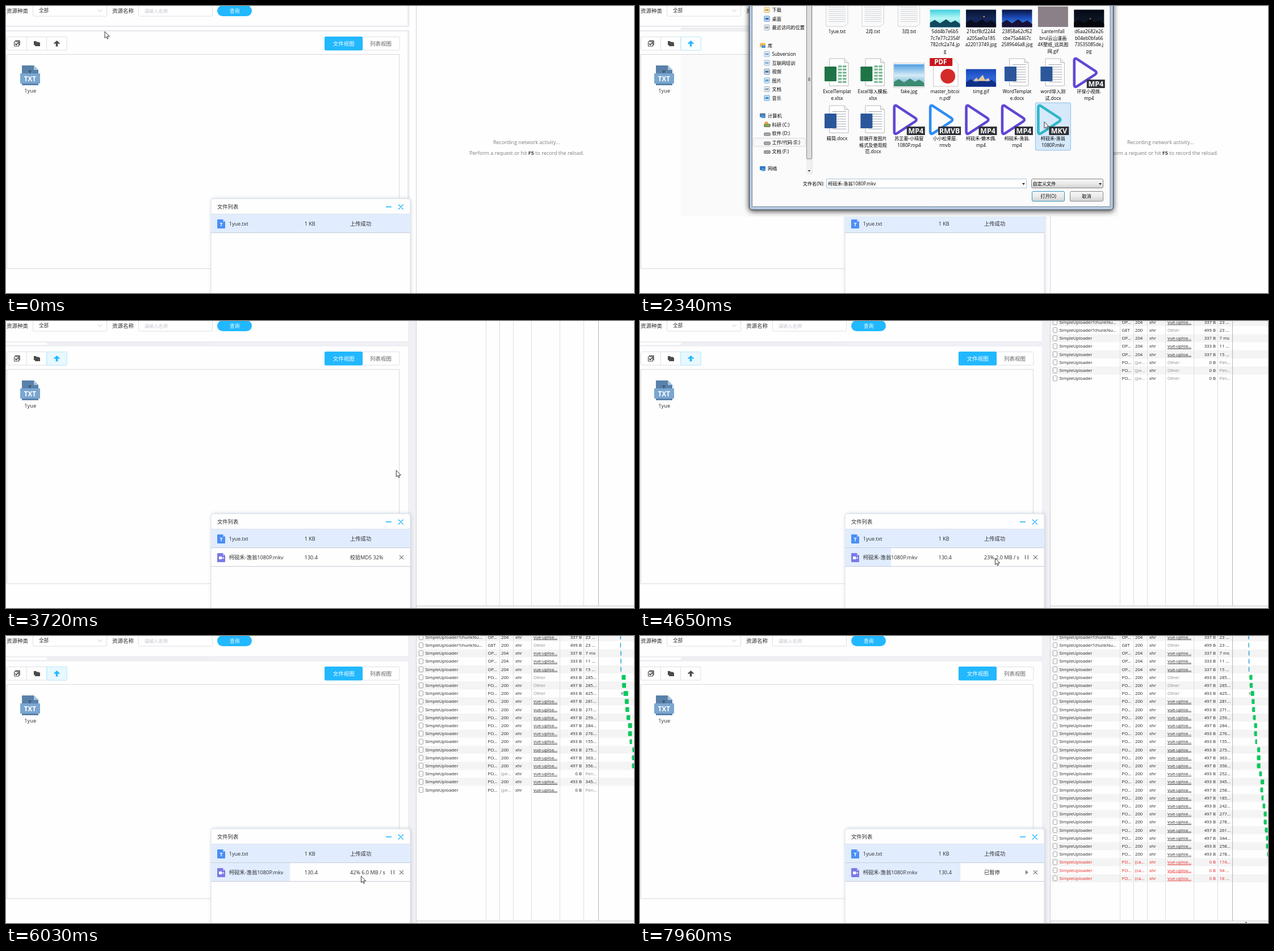
Recreate the animation shown at these times as an HTML page with a canvas. Size 1106 px wide and 507 px high, loop 8 s.

```html
<!DOCTYPE html>
<html lang="zh">
<meta charset="utf-8">
<style>
  html, body { margin: 0; width: 100%; height: 100%; overflow: hidden; background: #fff }
  canvas { display: block }
</style>
<canvas id="stage" width="1106" height="507"></canvas>
<script>
const g = document.getElementById('stage').getContext('2d');
const FONT = '"Open Sans","Noto Sans CJK SC","Noto Sans CJK JP","Noto Sans CJK",sans-serif';
const BLUE = '#22b8ff', LINE = '#dcdfe6', INK = '#2a2b2e';
const LOOP = 8000, VIDEO = '柯砚禾-渔翁1080P.mkv';

// Moments at which the picture is refreshed: first, last, count.
const ticks = [[0, 0, 1], [280, 850, 5], [1130, 1280, 2], [1410, 2100, 6], [2220, 3060, 7],
  [3210, 3210, 1], [3330, 4270, 8], [4410, 4650, 3], [4770, 5310, 5], [5460, 6450, 8],
  [6570, 6690, 2], [6840, 7570, 6], [7690, 7960, 3]]
  .flatMap(([a, b, n]) => Array.from({ length: n }, (_, i) => a + (n > 1 ? (b - a) * i / (n - 1) : 0)));
const OPEN = 1130, CLOSE = 2490, START = 3210, UPLOAD = 4400, PAUSE = 6980;

function key(points, t, col = 1) {
  const i = points.findIndex(p => p[0] > t);
  if (i < 0) return points.at(-1)[col];
  if (!i) return points[0][col];
  const a = points[i - 1], b = points[i];
  return a[col] + (b[col] - a[col]) * (t - a[0]) / (b[0] - a[0]);
}

function box(x, y, w, h, fill, stroke, r = 0) {
  g.beginPath();
  g.roundRect(x, y, w, h, r);
  if (fill) { g.fillStyle = fill; g.fill(); }
  if (stroke) { g.strokeStyle = stroke; g.lineWidth = 1; g.stroke(); }
}
function text(s, x, y, { size = 9.3, color = INK, align = 'left', weight = 400 } = {}) {
  g.font = `${weight} ${size}px ${FONT}`;
  g.fillStyle = color;
  g.textAlign = align;
  g.fillText(s, x, y + size * .37);
}
function path(d, x, y, fill, stroke, width = 1) {
  const p = new Path2D(d);
  g.save();
  g.translate(x, y);
  if (fill) { g.fillStyle = fill; g.fill(p); }
  if (stroke) {
    g.lineJoin = g.lineCap = 'round';
    g.strokeStyle = stroke;
    g.lineWidth = width;
    g.stroke(p);
  }
  g.restore();
}
function vertical(x, y, h, ...colors) {
  const v = g.createLinearGradient(x, y, x, y + h);
  colors.forEach((c, i) => v.addColorStop(i / (colors.length - 1), c));
  return v;
}

function page(t) {
  box(0, 0, 1106, 507, '#fefefe');
  const gutter = t >= START ? '#f1f1f5' : '#fff';
  box(0, 34, 722, 12, gutter);
  box(707, 0, 15, 507, gutter);
  if (t >= OPEN) {
    box(72, 38, 288, 4, '#eeeef1');
    box(0, 38, 72, 4, '#fff');
  }
  box(-9, -20, 718, 56.5, '#fefefe', '#e6e8ef', 3);
  box(-9, 44, 718, 520, '#fefefe', '#e6e8ef', 3);
  if (t < START) {
    box(0, 34.5, 709, 2.5, '#e9ebf1');
    box(0, 42.5, 709, 2.5, '#e9ebf1');
    box(707, 0, 3.5, 36, '#e9ebf1');
    box(707, 43, 3.5, 464, '#e9ebf1');
  }
  box(722, 0, 1, 507, '#d2d2d4');

  text('资源种类', 1, 8, { size: 9.5 });
  box(47.5, -8, 130, 26, '#fff', LINE, 2);
  text('全部', 58, 8, { size: 8.6 });
  path('M-3.5-1.5 0 2 3.5-1.5', 166, 8, null, '#c0c4cc');
  text('资源名称', 187, 8, { size: 9.5 });
  box(233.5, -8, 130, 26, '#fff', LINE, 2);
  text('请输入名称', 243.5, 8.5, { size: 8.4, color: '#c0c4cc' });
  box(372, -1, 61, 19, BLUE, null, 9.5);
  text('查询', 402.7, 8.5, { size: 8.6, color: '#fff', align: 'center', weight: 500 });

  const hover = t >= 700 && t < PAUSE;
  box(1.5, 54.5, 105.5, 23.5, '#fff', LINE, 2);
  if (hover) box(72, 54.5, 35, 23.5, t < CLOSE ? '#fbfeff' : '#e8f8ff', '#bde9ff');
  box(36, 54, 1, 24, LINE);
  box(71, 54, 1, 24, hover ? '#bde9ff' : LINE);
  box(14.5, 63, 8, 8, null, '#444');
  path('M16.5 61.5H24V69', 0, 0, null, '#444', 1.4);
  path('M16.3 66.8 18 68.6 21.2 65', 0, 0, null, '#444', 1.6);
  path('M49 62H53L54 63.5H58V69H49Z', 0, 0, '#4a4a4a');
  path('M51 64.5H60V71H51Z', 0, 0, '#4a4a4a');
  path('M0-5 5.5 0 4.5 1.2 1.8 0V5.5H-1.8V0L-4.5 1.2-5.5 0Z M-4 2.5H4', 89.5, 66, hover ? BLUE : '#4a4a4a');

  box(628, 54.5, 65, 23.5, '#fff', LINE, 2);
  box(561, 54, 67, 24.5, BLUE, null, 2);
  text('文件视图', 594.7, 66.3, { size: 9.5, color: '#fff', align: 'center' });
  text('列表视图', 660, 66.3, { size: 9.5, color: '#606266', align: 'center' });

  box(1.5, 85.5, 691, 378.5, '#fefefe', '#d8d8d8');
  path('M28 105H49L57 113V140H28Z', 0, 0, '#5981a9');
  path('M49 105V113H57Z', 0, 0, '#a9c4de');
  text('T', 42, 118, { size: 11, color: '#35516f', align: 'center', weight: 700 });
  box(25, 119, 35, 18, '#7aa6d0', null, 1);
  text('TXT', 42.3, 129, { size: 11.5, color: '#fff', align: 'center', weight: 700 });
  text('1yue', 42.7, 149.5, { align: 'center' });
}

function idlePanel() {
  const o = { size: 9, color: '#7c7c7c' };
  text('Recording network activity...', 916.7, 240.5, { ...o, align: 'center' });
  let x = 816.3;
  for (const [s, weight] of [['Perform a request or hit ', 400], ['F5', 700], [' to record the reload.', 400]]) {
    text(s, x, 259.5, { ...o, weight, color: weight > 400 ? '#444' : o.color });
    x += g.measureText(s).width;
  }
}

const DURATIONS = [23, 23, 7, 11, 15, 285, 285, 425, 281, 271, 259, 284, 276, 155, 275, 363, 356, 252,
  345, 258, 185, 242, 277, 278, 261, 344, 258, 278, 174, 94, 16];
const BAR_STARTS = [30.7, 31.2, 33, 34.7, 35.5, 37, 39, 39, 41, 44.5, 44, 44, 48, 50.5, 50, 52, 54, 56,
  56, 58, 60, 60, 62];
const LARGE = [6, 8, 10, 11, 15, 16, 19, 20, 22, 24, 25];

function network(t) {
  const total = Math.floor(key([[4409, 0], [4410, 2], [4530, 5], [4650, 8], [5460, 14], [6690, 29], [PAUSE, 31]], t));
  const done = Math.floor(key([[4409, 0], [4410, 2], [4530, 5], [4650, 5], [5460, 11], [6690, 25], [PAUSE, 28]], t));
  const zoom = key([[4650, 2.3], [4790, 2.15], [5460, 1.62], [6690, 1.06], [7700, 1]], t);
  for (let i = 0; i < total; i++) {
    const y = 2 + 14.2 * i;
    if (i % 2 == 0) box(723, y - 7, 383, 14.2, '#f4f4f4');
    const early = i == done + 1 && t > 5000 && t < PAUSE;
    const ok = i < done || early, partial = early && t < 6000;
    const canceled = !ok && t >= PAUSE;
    const color = canceled ? '#e8211f' : '#222', o = { size: 7.75, color };
    const muted = { ...o, color: canceled || ok ? color : '#888' };
    const other = i == 1 || i > 4 && i < 8;
    box(727.5, y - 4.5, 7, 9, '#fff', '#a0a0a0', 1);
    text(i < 2 ? 'SimpleUploader?chunkNu...' : 'SimpleUploader', 738.5, y, o);
    text(i == 1 ? 'GET' : i < 5 ? 'OP...' : 'PO...', 848.5, y, o);
    text(canceled ? '(ca...' : !ok ? '(pe...' : i != 1 && i < 5 ? '204' : '200', 872, y, muted);
    text('xhr', 897, y, o);
    text(other ? 'Other' : 'vue-uploa...', 929, y, { ...o, color: other ? '#888' : color });
    if (!other) box(929, y + 4, 42, .8, color);
    const size = !ok ? 0 : partial ? 334 : i == 1 ? 499 : i == 3 ? 333 : i < 5 ? 337 : LARGE.includes(i) ? 497 : 493;
    text(size + ' B', 1014, y, { ...o, align: 'right' });
    const ms = DURATIONS[i], waiting = !canceled && (!ok || partial);
    const time = waiting ? 'Pen...' : ms > 99 ? ms + '...' : ms > 9 ? ms + ' ...' : ms + ' ms';
    text(time, 1020.5, y, { ...o, color: waiting ? '#888' : color });
    if (i < 5) box(1043 + (i < 2 ? 28.3 : 28.8) * zoom, y - 4, 1.5, 8, i == 1 ? '#36b0c9' : '#1ea1dc');
    else if (ok) {
      const x = 1043 + BAR_STARTS[i - 5] * zoom;
      if (i == 7) box(x - 3.5 * zoom, y - 2, 3 * zoom, 4, '#aaa');
      else box(x - 1.6, y - 2, 1, 4, '#c8c8c8');
      box(x - .3, y - 4.2, Math.min(ms, 340) / 62 * zoom + .5, 8.6, '#08c95c');
    }
  }
  for (const x of [845, 869, 893, 925, 975, 1017]) box(x, 0, 1, 503, '#dedede');
  box(1043, 0, 1, 503, '#b4b4b4');
  box(723, 503, 383, 1, '#c4c4c4');
}

function fileIcon(y, color) {
  path('M1 0H10L14 4V15Q14 16 13 16H1Q0 16 0 15V1Q0 0 1 0Z', 372, y, color);
  path('M10 0V4H14Z', 372, y, '#ffffff88');
}

function uploads(t) {
  g.save();
  g.shadowColor = '#8090b066';
  g.shadowBlur = 6;
  g.shadowOffsetX = 1;
  box(361, 340, 351, 180, '#fff', null, 5);
  g.restore();
  box(361, 340.5, 351, 180, '#fefefe', '#dde1ea', 5);
  text('文件列表', 372, 354.5);
  box(669, 354, 10, 1.6, BLUE);
  path('M-4-4 4 4M4-4-4 4', 695.3, 355, null, BLUE, 1.4);
  box(361.5, 367, 350, 33.5, '#e1edfe');
  box(361, 367, 351, 1, '#dbe0ea');
  box(361, 400, 351, 1, '#c6ccd6');
  fileIcon(377, '#4b8ff8');
  text('T', 379, 386, { size: 9, color: '#fff', align: 'center', weight: 700 });
  text('1yue.txt', 392.7, 384.3, { size: 9.1 });
  text('1 KB', 525.7, 384.3, { size: 9.1 });
  text('上传成功', 606, 384.3);

  if (t < START) return;
  const paused = t >= PAUSE;
  const fill = key([[UPLOAD, 0], [4530, .13], [4650, .23], [5460, .302], [6690, .504], [7300, .578]], t);
  box(361.5, 401, 351 * fill, 32.5, '#e1edfe');
  box(361, 433, 351, 1, '#c6ccd6');
  fileIcon(410, '#7b79e8');
  box(375, 416, 5.5, 5, '#fff', null, 1);
  path('M381 418.5 383.5 416.5V420.5Z', 0, 0, '#fff');
  text(VIDEO, 392.7, 417.3);
  text('130.4', 525.7, 417.3, { size: 9.1 });
  const percent = Math.floor(key([[UPLOAD, 0], [4530, 12], [4650, 23], [5460, 31], [6690, 56], [PAUSE, 59]], t));
  const speed = key([[UPLOAD, .4], [4650, 2], [5460, 3.7], [6690, 8.7]], t).toFixed(1);
  const check = Math.floor(key([[START, 0], [UPLOAD, 100]], t));
  text(paused ? '已暂停' : t < UPLOAD ? `校验MD5 ${check}%` : `${percent}% ${speed} MB / s`, 606, 417.3, { size: paused ? 9.3 : 9.1 });
  if (paused) path('M679 413.5V421.5L684 417.5Z', 0, 0, '#888');
  else if (t >= UPLOAD) {
    const color = t > 6600 ? '#1768b8' : '#999';
    box(677.7, 413.5, 2, 7.5, color);
    box(682.3, 413.5, 2, 7.5, color);
  }
  path('M-3.2-3.2 3.2 3.2M3.2-3.2-3.2 3.2', 696.5, 417.5, null, '#777', 1.2);
}

const NAV = [['下载', 7, '#e2ad46'], ['桌面', 22.5, '#3474c4'], ['最近访问的位置', 38, '#9aa9b8'],
  ['库', 69.5, '#e8bd58', 1], ['Subversion', 85, '#8cb2d8'], ['互联网培训', 100.5, '#8cb2d8'], ['视频', 116, '#52779f'],
  ['图片', 131.5, '#62a5d8'], ['文档', 147, '#9aa9b8'], ['音乐', 162.5, '#3c92d8'], ['计算机', 193.5, '#527ba8', 1],
  ['科研 (C:)', 209.5, '#77a84e'], ['软件 (D:)', 225, '#a3a8ae'], ['工作/代码 (E:)', 241, '#a3a8ae'],
  ['文档 (F:)', 256.5, '#a3a8ae'], ['网络', 287, '#317bc5', 1]];

const FILES = [
  ['text', '1yue.txt'], ['text', '2月.txt'], ['text', '3月.txt'], ['peaks', '5dd4b7e6b5|7c7e77c2354f|782cfc2a74.jp|g'],
  ['night', '21bcf8cf2244|a205ae0a185|a22013749.jpg'], ['dusk', '23858a62cf62|cbe75a4467c|2589646a8.jpg'],
  ['paint', 'Lanternfall|brul云山漫画|4K壁纸_远岚图|网.gif'], ['dark', 'd6aa2682e26|b04eb0bfa66|73535085de.j|pg'],
  ['sheet', 'ExcelTemplat|e.xlsx'], ['sheet', 'Excel导入模板.|xlsx'], ['lake', 'fake.jpg'], ['pdf', 'master_bitcoi|n.pdf'],
  ['harbor', 'timg.gif'], ['doc', 'WordTemplat|e.docx'], ['doc', 'word导入测|试.docx'], ['MP4', '环保小视频.|mp4'],
  ['doc', '精简.docx'], ['doc', '前端开发图片|格式及使用规|范.docx'], ['MP4', '苏芷蘅-小晴窗|1080P.mp4'], ['RMVB', '小小松果屋.|rmvb'],
  ['MP4', '柯砚禾-懒木偶.|mp4'], ['MP4', '柯砚禾-渔翁.|mp4'], ['MKV', '柯砚禾-渔翁|1080P.mkv']];

// Sky colours from top to bottom, then the hills.
const PICTURES = {
  peaks: [['#3fd0e0', '#b9f8f6', '#5cc9d2'], '#11495e'],
  night: [['#06112e', '#14285a', '#0b1635'], '#080d20'],
  dusk: [['#081440', '#1f4fc4', '#39a8dc'], '#1a1038'],
  paint: [['#8b8088', '#8b8088']],
  dark: [['#040814', '#0b1424', '#141519'], '#05070b'],
  lake: [['#4f9fe2', '#d5ebf6', '#5ba9d0'], '#3d8a72'],
  harbor: [['#1747b8', '#2f66d8', '#1a49b0'], '#0e2f86'],
};
const TRIANGLES = { MP4: '#6246d2', RMVB: '#2f8cf2', MKV: '#2fb7c8' };

function lines(x, y, w, n, gap, color) {
  for (let i = 0; i < n; i++) box(x, y + i * gap, w, 1, color);
}

// Icon with its cell centre at x and its upper edge at y.
function icon(kind, x, y) {
  if (PICTURES[kind]) {
    const [sky, hill] = PICTURES[kind], big = kind == 'lake', paint = kind == 'paint';
    const h = big ? 39 : paint ? 36 : 31, top = y + (big ? 12 : paint ? 15 : 20.5);
    if (big) box(x - 27, top - 2, 54, h + 4, '#fff', '#c4c4c4');
    box(x - 26.5, top, 53, h, vertical(x, top, h, ...sky));
    if (hill) path(`M-26.5 ${h}V${h - 8}L-18 ${h - 13} -9 ${h - 7} 2 ${h - 14} 10 ${h - 8} 18 ${h - 12} 26.5 ${h - 6}V${h}Z`, x, top, hill);
    if (kind == 'harbor') path('M-14 21 -8 15-5 19 3 10 7 19 13 16 16 21Z', x, top, '#e8c89c');
    if (kind == 'night') box(x + 4, top + 11, 2.5, 2.5, '#f2a13c', null, 1.2);
    if (kind == 'dark') box(x + 1, top + 15, 2, 2, '#e8b45a', null, 1);
  } else if (TRIANGLES[kind]) {
    path('M-26 5Q-26-1-21 2L11 23Q15 26 11 29L-21 50Q-26 53-26 47Z', x, y + .8, null, TRIANGLES[kind], 4.6);
    const w = kind == 'RMVB' ? 40 : kind == 'MKV' ? 35 : 32;
    box(x + 28 - w, y + 39, w, 15, '#303238');
    text(kind, x + 28 - w / 2, y + 46.8, { size: 12.5, color: '#fff', align: 'center', weight: 700 });
  } else if (kind == 'text') {
    path('M-19 0H19V40L13 45H-19Z', x, y + 5, '#fafafa', '#d2d2d2');
    lines(x - 15, y + 12, 30, 9, 3.6, '#cbd0d6');
  } else if (kind == 'pdf') {
    path('M-20 2H14L23 11V51H-20Z', x, y, '#fdfdfd', '#c8c8c8');
    box(x - 8, y + 20, 26, 26, '#d42a2a', null, 13);
    box(x - 27, y + 1, 40, 14, '#c8161d', null, 1);
    text('PDF', x - 8, y + 8, { size: 11.5, color: '#fff', align: 'center', weight: 700 });
  } else {
    const sheet = kind == 'sheet';
    path('M-13 2H13L20 9V50H-13Z', x, y, '#fff', '#b8b8b8');
    path('M13 2V9H20', x, y, '#eee', '#b8b8b8');
    if (sheet) for (let i = 0; i < 12; i++) box(x + 2 + i % 2 * 8, y + 14 + (i >> 1) * 5.5, 6.5, 3.5, '#7db994');
    else lines(x - 8, y + 12, 24, 8, 4.4, '#a3a8b0');
    box(x - 22, y + 16, 21, 26, sheet ? '#1f7446' : '#2b579a', null, 1);
  }
}

function button(x, y, w, h, border = '#888') {
  box(x + .5, y + .5, w, h, vertical(x, y, h, '#f6f6f6', '#ececec', '#d2d2d2'), border, 2);
}

function dialog(t) {
  const chosen = t >= 2090;
  g.save();
  if (t < 1280) g.globalAlpha = .55;
  g.shadowColor = '#000b';
  g.shadowBlur = 10;
  g.shadowOffsetY = 2;
  box(192.5, -20, 641, 380, '#bfd3e9', '#39424e', 5);
  g.shadowColor = 'transparent';
  box(197.5, -20, 630.5, 374.5, '#fbfbfb', '#70859c');

  for (const [name, y, color, top] of NAV) {
    if (y == 241) box(199.5, 233.5, 92, 14.5, '#f8f8f8', '#d8d8d8', 2);
    const x = top ? 211 : 218.5;
    if (y > 200 && y < 260) {
      box(x, y - 1, 11, 5, color, '#777', 1.5);
      if (y < 215) box(x + 1, y - 5, 6, 4, '#e8a23c');
    } else if (top) {
      box(x, y - 4, 10, 7, color, null, 1);
      box(x + 3, y, 7, 4.5, '#4a96d8', null, 1);
    } else {
      box(x + .5, y - 4.5, 9, 9, '#f2f6fa', color, 1);
      box(x + 2, y - 2, 6, 4, color);
    }
    text(name, top ? 225 : 232.5, y, { size: 8.2, color: '#000' });
  }
  box(293, 0, 10, 298, '#f0f0f0');
  box(293.5, -5, 9, 275, '#dedede', '#868686', 1);
  lines(296, 127, 4, 3, 2, '#555');
  path('M-2.5-1H2.5L0 2Z', 298, 291, '#444');
  box(303, 0, 1, 298, '#e4e4e4');

  FILES.forEach(([kind, label], i) => {
    const x = 347 + 63.4 * (i % 8), row = i >> 3;
    const y = [-14, 91, 174][row], labelY = [45, 151.3, 234.3][row];
    if (chosen && kind == 'MKV') box(x - 31, y - 3, 62, 84, '#d5e9fb', '#8dbde6', 2);
    icon(kind, x, y);
    label.split('|').forEach((s, n) => text(s, x, labelY + n * 11.6, { size: 8.1, color: '#000', align: 'center' }));
  });

  const small = { size: 8.2, color: '#000' };
  text('文件名(N):', 324.5, 313.5, { ...small, align: 'right' });
  box(328.5, 305.5, 352, 16, '#fff', '#a9c4d8');
  if (chosen) text(VIDEO, 331, 313.5, small);
  else box(330.5, 308, 1, 11, '#000');
  path('M-2.5-1H2.5L0 2Z', 675.5, 314, '#111');
  button(689, 305, 126, 16);
  text('自定义文件', 691.5, 313.5, small);
  path('M-2.5-1H2.5L0 2Z', 810.5, 314, '#111');
  button(690, 327, 57, 17.5, '#2f92c4');
  button(757, 327, 58, 17.5);
  text('打开(O)', 719, 336.3, { ...small, align: 'center' });
  text('取消', 786.5, 336.3, { ...small, align: 'center' });
  g.restore();
}

// Faint leftovers of the window around the open dialog and after it.
function haze(t) {
  if (t < CLOSE) {
    box(72, 86, 120, 286, '#fafafa');
    box(72, 360, 771, 12, '#fafafa');
  } else {
    box(72, 86, 112, 286, '#fafafa');
    box(107, 18, 77, 16, '#fafafa');
    box(107, 47, 77, 26, '#fafafa');
  }
}

const MOVES = [[0, 174, 45.5], [280, 168, 47], [710, 104, 68], [850, 98.5, 70], [1280, 98.5, 70], [1410, 190, 95],
  [1960, 712, 205], [3330, 712, 205], [4270, 625.5, 412], [4650, 625.5, 419.5], [5460, 625.5, 424.5],
  [6150, 625.5, 424.5], [6570, 683, 418], [7130, 683, 418], [7280, 690, 430], [7570, 761, 391],
  [7690, 870, 432], [7960, 1067, 505.5]];

function cursor(t) {
  const x = key(MOVES, t), y = key(MOVES, t, 2);
  if (t >= 2600 && t < 3330) {
    g.lineWidth = 3.2;
    ['#3f7f8c', '#9ee3e0', '#34b5b0', '#c5d8dc'].forEach((c, i) => {
      g.beginPath();
      g.arc(712.7, 210.3, 5, i * Math.PI / 2, (i + 1) * Math.PI / 2);
      g.strokeStyle = c;
      g.stroke();
    });
  } else if (t >= 6500 && t < 7200) {
    path('M-1.2 1Q0-.6 1.2 1V5.5L5 6.3Q6 6.7 6 8V11L4.5 15H-2L-5 10Q-5.5 8-3.8 8.6L-1.2 10Z', x, y, '#fff', '#111', .9);
    path('M2.7 6V8.5M4.5 6.3V8.5', x, y, null, '#111', .6);
  } else path('M0 0V11L2.6 8.8 4.3 12.6 6 11.8 4.4 8.1H7.8Z', x, y, '#fff', '#222', .9);
}

function tooltip() {
  box(72, 23, 29, 23, '#303133', null, 3);
  path('M85 46H94L89.5 50Z', 0, 0, '#303133');
  text('上传', 86.7, 34.5, { size: 8.5, color: '#fff', align: 'center' });
}

function draw(t) {
  page(t);
  if (t < START) idlePanel(); else network(t);
  uploads(t);
  if (t >= OPEN && t < 3330) haze(t);
  if (t >= OPEN && t < CLOSE) dialog(t);
  if (t >= 850 && t < 1410) tooltip();
  cursor(t);
}

const begin = performance.now();
function frame() {
  const now = Math.max(0, performance.now() - begin) % LOOP;
  draw(ticks.findLast(s => s <= now));
  requestAnimationFrame(frame);
}
frame();
</script>
</html>
```
